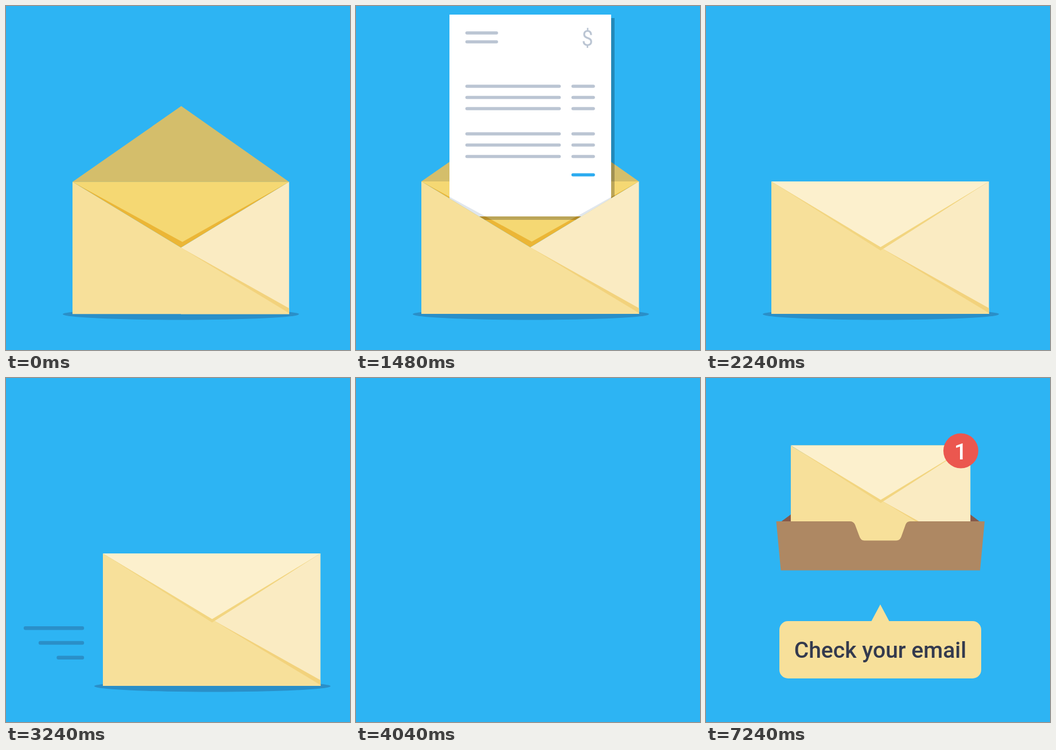
An HTML page that plays this animation: 600x600 px, repeating every 9.24 s.

```html
<!DOCTYPE html>
<html lang="en">
<head>
<meta charset="utf-8">
<title>Check your email</title>
<style>
  html, body { margin: 0; width: 100%; height: 100%; overflow: hidden; background: #2db4f3; }
  svg { display: block; width: 100vw; height: 100vh; }
  text { font-family: Roboto, sans-serif; }
</style>
</head>
<body>
<svg viewBox="0 0 600 600">
  <defs>
    <clipPath id="mouth"><path d="M0-10H600V306H494L304 421L114 306H0Z"/></clipPath>
    <clipPath id="sheet"><rect id="sheetBox" x="163" width="282" height="352"/></clipPath>
    <g id="front">
      <path fill="#faebc2" d="M493.5 306V537H304V421Z"/>
      <path fill="#f2d27c" d="M304 421L493.5 527V537H304Z"/>
      <path fill="#f7e09a" d="M114 306L304 421L493.5 535.5V537H114Z"/>
    </g>
    <g id="closed">
      <use href="#front"/>
      <path fill="#f2d580" d="M114 305.5H493.5L304 427Z"/>
      <path fill="#fcf0cd" d="M114 305.5H493.5L304 420.5Z"/>
    </g>
  </defs>

  <g id="envelope">
    <ellipse cx="305" cy="537.5" rx="206" ry="10" fill="#2a8fc8"/>
    <g id="body">
      <path id="flapBack" fill="#d4be6b"/>
      <path fill="#ebb636" d="M114 306H493.5L304 421Z"/>
      <path fill="#f5d873" d="M114 306H493.5L306.5 411Z"/>
      <g id="letter" clip-path="url(#mouth)">
        <g id="paper">
          <path fill="#000" fill-opacity=".24" d="M169 6H451V358H169Z"/>
          <path fill="#fff" d="M163 0H445V352H163Z"/>
          <g fill="none" stroke="#bbc5d3" stroke-width="5.6" stroke-linecap="round">
            <path d="M193.5 32H245M193.5 47.5H245"/>
            <path id="rows"/>
            <path stroke="#2dacf0" d="M378.5 279.5H414"/>
          </g>
          <text x="403.5" y="54" font-size="36" text-anchor="middle" fill="#bbc5d3">$</text>
        </g>
        <path clip-path="url(#sheet)" fill="#6482a5" fill-opacity=".2" d="M114 306L306.5 411L493.5 306L304 421Z"/>
      </g>
      <use href="#front"/>
      <g id="flapFront">
        <path id="flapEdge" fill="#f2d580"/>
        <path id="flapFace" fill="#fcf0cd"/>
      </g>
    </g>
    <path id="speed" fill="none" stroke="#2a8fc8" stroke-width="6.4" stroke-linecap="round"
      d="M-21 436.3H78M5 462H78M36.500 487.700H78"/>
  </g>

  <g id="tray">
    <path fill="#86594a" d="M131 250.500L148 238H461L477.500 250.500Z"/>
    <use href="#closed" transform="translate(53.800 -134.600) scale(.8255)"/>
    <path fill="#ae8863" d="M122.500 250H251Q257.500 250 260 256L267.500 276Q270 283.500 276 283.500H332Q338 283.500 340.500 277L348 256Q350 250 356 250H486L478 335.500H130.500Z"/>
  </g>

  <g id="badge">
    <circle cx="444.500" cy="127" r="30.500" fill="#eb574f"/>
    <text x="444" y="141.500" font-size="39" font-weight="500" text-anchor="middle" fill="#fff">1</text>
  </g>

  <g id="bubble">
    <path fill="#f7e09a" d="M304 395L320 425H288Z"/>
    <rect x="128" y="424" width="352" height="100" rx="15" fill="#f7e09a"/>
    <text x="304" y="488" font-size="39" font-weight="500" text-anchor="middle" fill="#343a4e">Check your email</text>
  </g>
</svg>

<script>
const LOOP = 9240;
const $ = id => document.getElementById(id);
const show = (id, on) => $(id).setAttribute('display', on ? 'inline' : 'none');
const move = (id, x, y) => $(id).setAttribute('transform', `translate(${x} ${y})`);
const flap = (id, apex) => $(id).setAttribute('d', `M114 306H493.500L304.500 ${apex}Z`);

// Number of completed steps since a start time, limited to max
const steps = (t, start, size, max) =>
  Math.max(0, Math.min(max, Math.floor((t - start) / size) + 1));

$('rows').setAttribute('d', [125, 144.5, 164, 208, 227.5, 247.5]
  .map(y => `M193.500 ${y}H354.500M378.500 ${y}H414`).join(''));

function draw(t) {
  const drop = steps(t, 1000, 80, 12);
  const fold = steps(t, 1940, 60, 6);
  const slide = steps(t, 3240, 100, 9);

  const top = -405 + 60 * drop;
  move('paper', 0, top);
  $('sheetBox').setAttribute('y', top);
  show('letter', drop > 0);

  const apex = drop < 12 ? 173.5 : Math.min(420.5, 190 + 39 * fold);
  const folded = apex > 306;
  show('flapBack', !folded);
  show('flapFront', folded);
  flap('flapBack', apex);
  flap('flapFace', apex);
  flap('flapEdge', apex + fold);

  // The resting envelope is a touch narrower before the letter arrives
  $('body').setAttribute('transform', drop ? '' : 'translate(2.500 1.500) scale(.9955 .9975)');
  move('envelope', 55 * slide, 0);
  show('speed', slide > 0);
  show('envelope', slide < 9);

  show('tray', t >= 5040);
  show('badge', t >= 6040);
  show('bubble', t >= 7240);
}

const begin = performance.now();
function tick() {
  draw((performance.now() - begin) % LOOP);
  requestAnimationFrame(tick);
}
tick();
</script>
</body>
</html>
```
